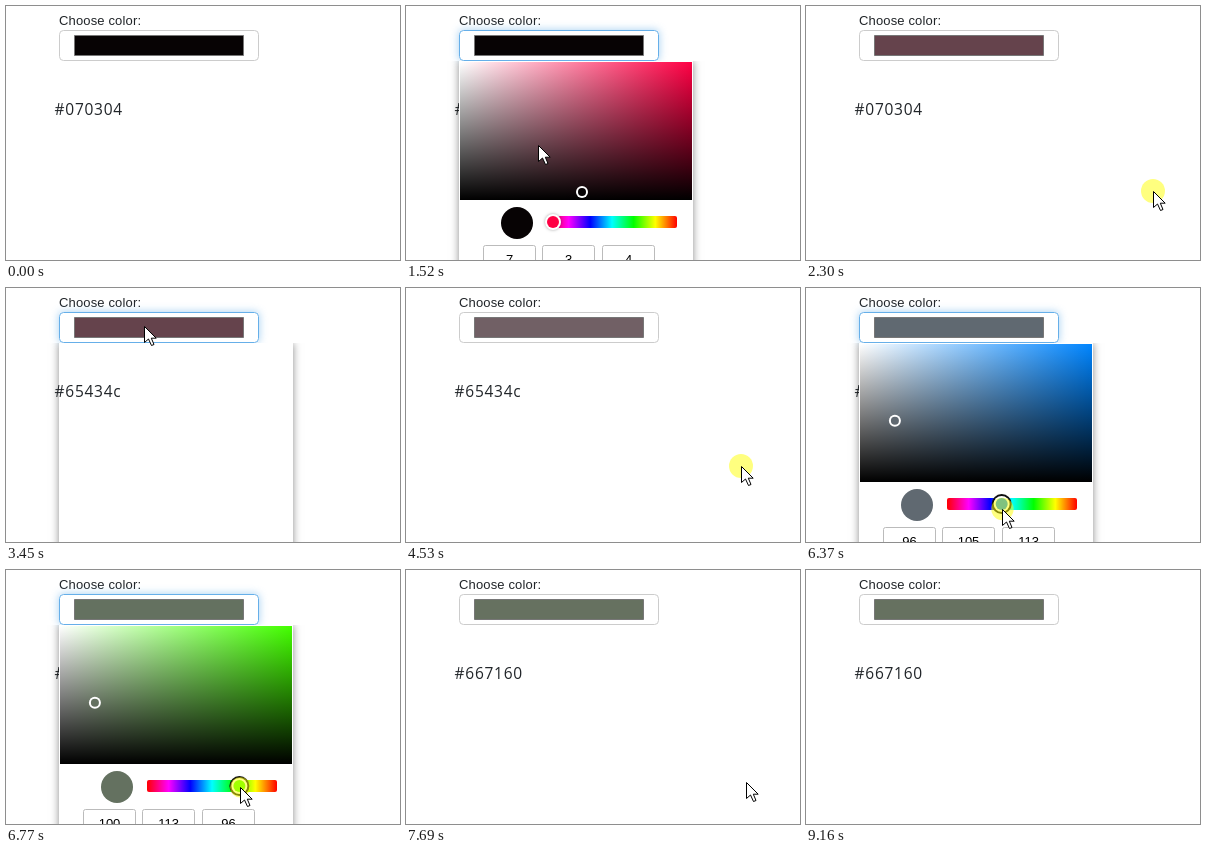
These frames come from a looping animation (394x254 px, 9.47 s). An HTML page with a canvas:

```html
<!DOCTYPE html>
<html lang="en">
<head>
<meta charset="utf-8">
<title>Color input</title>
<style>
html, body { margin: 0; width: 100%; height: 100%; overflow: hidden; background: #fff; }
canvas { display: block; width: 394px; height: 254px; }
</style>
</head>
<body>
<canvas id="stage" width="394" height="254"></canvas>
<script>
const ctx = document.getElementById('stage').getContext('2d');
const LOOP = 9470;
const SANS = '"Liberation Sans", Arial, sans-serif';
const SV = { x: 54, y: 56, w: 232, h: 138 };
const HUE = { x: 141, y: 210, w: 130, h: 12 };
const FIELD = { x: 138, y: 38 };

// Each visit: go to the field, open the picker, choose, then click outside.
const VISITS = [
  { start: 200, pick: { x: 132, y: 139.4 }, leave: 1790, out: 2220, rest: { x: 347, y: 185 } },
  { start: 2640, pick: { x: 88.9, y: 132.85 }, leave: 4130, out: 4450, rest: { x: 335, y: 178 } },
  { start: 4720, pick: { x: 147.5, y: 226 }, dragTo: { x: 236.4, y: 217 },
    leave: 6850, out: 7230, rest: { x: 340, y: 193 } }
];

// Delays after the start of a visit, and after the click outside
const ARRIVE = 580, FOCUS = 630, OPEN = 790, READY = 870, GO = 1010, PICK = 1340;
const HOLD = 120, COMMIT = 310;

const clamp = (v, lo = 0, hi = 1) => Math.min(hi, Math.max(lo, v));
const progress = (t, from, to) => clamp((t - from) / (to - from));
const smooth = k => k * k * (3 - 2 * k);
const easeOut = k => 1 - (1 - k) ** 1.6;
const lerp = (a, b, k) => ({ x: a.x + (b.x - a.x) * k, y: a.y + (b.y - a.y) * k });
const rgb = c => `rgb(${c.join(',')})`;
const hex = c => '#' + c.map(v => v.toString(16).padStart(2, '0')).join('');

function buildLegs() {
  const legs = [];
  let at = { x: 232, y: 262 };
  const move = (from, to, target, ease = smooth) => {
    legs.push({ from, to, a: at, b: target, ease });
    at = target;
  };
  for (const v of VISITS) {
    move(v.start, v.start + ARRIVE, FIELD);
    move(v.start + GO, v.start + PICK - 20, v.pick);
    if (v.dragTo) move(v.start + PICK, v.leave, v.dragTo, easeOut);
    move(v.leave, v.out - 20, v.rest);
  }
  move(7580, 7900, { x: at.x, y: 260 });
  return legs;
}
const LEGS = buildLegs();

function pointerAt(t) {
  if (t > 8260) {
    const k = progress(t, 8260, 9140);
    return { x: 354 + 15 * k, y: 260 - 207 * Math.sin(Math.PI * k) };
  }
  const leg = LEGS.filter(l => l.from <= t).pop() || LEGS[0];
  return lerp(leg.a, leg.b, leg.ease(progress(t, leg.from, leg.to)));
}

function hsv(h, s, v) {
  return [5, 3, 1].map(n => {
    const k = (n + h / 60) % 6;
    return Math.round(255 * v * (1 - s * clamp(Math.min(k, 4 - k))));
  });
}

function stateAt(t) {
  const state = { color: [7, 3, 4], ring: { x: 176, y: 186 }, thumb: 147, hue: 344 };
  for (const v of VISITS.filter(v => t >= v.start + PICK)) {
    if (v.dragTo) {
      state.thumb = pointerAt(Math.min(t, v.leave)).x - 0.8;
      state.hue = 360 * (1 - (state.thumb - HUE.x) / HUE.w);
      state.dragged = true;
    } else {
      state.ring = v.pick;
    }
    const { x, y } = state.ring;
    state.color = hsv(state.hue, (x - SV.x) / SV.w, 1 - (y - SV.y) / SV.h);
  }
  return state;
}

function hexAt(t) {
  const done = VISITS.filter(v => t >= v.out + COMMIT).pop();
  return hex(stateAt(done ? done.out : 0).color);
}

function markerRadius(t) {
  for (const v of VISITS) {
    const picked = v.start + PICK;
    const release = v.dragTo ? v.leave : picked + HOLD;
    if (t >= picked && t < release) return v.dragTo ? 12 - 2 * progress(t, picked, release) : 12;
    const clicks = [v.start + FOCUS, v.out];
    if (clicks.some(c => t >= c && t < c + HOLD + 30)) return 12;
  }
  return 0;
}

function box(x, y, w, h, r, fill, stroke) {
  ctx.beginPath();
  ctx.roundRect(x, y, w, h, r);
  if (fill) { ctx.fillStyle = fill; ctx.fill(); }
  if (stroke) { ctx.strokeStyle = stroke; ctx.lineWidth = 1; ctx.stroke(); }
}

function disc({ x, y }, r, fill) {
  ctx.beginPath();
  ctx.arc(x, y, r, 0, Math.PI * 2);
  ctx.fillStyle = fill;
  ctx.fill();
}

function text(str, x, y, font, color, spacing = 0, align = 'left') {
  ctx.font = font;
  ctx.letterSpacing = spacing + 'px';
  ctx.textAlign = align;
  ctx.fillStyle = color;
  ctx.fillText(str, x, y);
}

function withShadow(color, blur, draw) {
  ctx.save();
  ctx.shadowColor = color;
  ctx.shadowBlur = blur;
  draw();
  ctx.restore();
}

function gradient(x0, y0, x1, y1, stops) {
  const g = ctx.createLinearGradient(x0, y0, x1, y1);
  stops.forEach((c, i) => g.addColorStop(i / (stops.length - 1), c));
  return g;
}

function drawHex(t) {
  text(hexAt(t), 48.5, 109, '15.5px "Open Sans", "Noto Sans", sans-serif', '#212529', 0.75);
}

function drawField(color, glow) {
  text('Choose color:', 53, 19, '13px ' + SANS, '#212529', 0.15);
  withShadow(`rgba(102,175,233,${0.6 * glow})`, 8, () => box(53, 24, 200, 31, 4, '#fff'));
  const border = [204 - 102 * glow, 204 - 29 * glow, 204 + 29 * glow].map(Math.round);
  box(53.5, 24.5, 199, 30, 4, '#fff', rgb(border));
  box(68.5, 29.5, 169, 20, 0, rgb(color), '#777');
}

function drawPanel() {
  ctx.save();
  ctx.beginPath();
  ctx.rect(0, 55, 394, 199);
  ctx.clip();
  withShadow('rgba(0,0,0,.45)', 8, () => box(53, 55, 234, 220, 0, '#fff'));
  ctx.restore();
}

function drawPicker({ color, ring, thumb, hue, dragged }) {
  const fill = rgb(color);
  const pure = rgb(hsv(hue, 1, 1));
  const { x, y, w, h } = SV;

  box(x, y, w, h, 0, gradient(x, 0, x + w, 0, ['#fff', pure]));
  box(x, y, w, h, 0, gradient(0, y, 0, y + h, ['rgba(0,0,0,0)', '#000']));
  disc(ring, 6, '#fff');
  disc(ring, 4, fill);
  disc({ x: 111, y: 217 }, 16, fill);

  const rainbow = Array.from({ length: 7 }, (_, i) => `hsl(${360 - i * 60},100%,50%)`);
  box(HUE.x, HUE.y, HUE.w, HUE.h, 2, gradient(HUE.x, 0, HUE.x + HUE.w, 0, rainbow));
  const knob = { x: thumb, y: 216 };
  if (dragged) disc(knob, 10, '#101010');
  withShadow('rgba(0,0,0,.35)', 3, () => disc(knob, 8, '#fff'));
  disc(knob, 6, pure);

  color.forEach((value, i) => {
    const left = Math.round(77 + i * 59.4);
    box(left + 0.5, 239.5, 52, 24, 2, '#fff', '#bbb');
    text(String(value), left + 26.5, 258, '13px ' + SANS, '#000', 0, 'center');
  });
}

function drawPointer({ x, y }) {
  ctx.save();
  ctx.translate(Math.round(x) + 0.5, Math.round(y) + 0.5);
  const arrow = new Path2D('M0 0V16L4 12.5L7 19L9.5 18L6.8 11.7H11.7Z');
  ctx.fillStyle = '#fff';
  ctx.strokeStyle = '#000';
  ctx.lineWidth = 1;
  ctx.fill(arrow);
  ctx.stroke(arrow);
  ctx.restore();
}

function draw(t) {
  const state = stateAt(t);
  const pointer = pointerAt(t);
  const visit = VISITS.find(v => t >= v.start + OPEN && t < v.out);
  const glow = Math.max(...VISITS.map(v => Math.min(
    progress(t, v.start + FOCUS, v.start + FOCUS + 120),
    1 - progress(t, v.out, v.out + 80))));

  ctx.fillStyle = '#fff';
  ctx.fillRect(0, 0, 394, 254);
  drawField(state.color, glow);
  const ready = visit && t >= visit.start + READY;
  if (ready) drawHex(t);
  if (visit) drawPanel();
  if (ready) drawPicker(state);
  else drawHex(t);

  const radius = markerRadius(t);
  if (radius) disc(pointer, radius, 'rgba(255,255,0,.5)');
  drawPointer(pointer);
}

const start = performance.now();
function tick() {
  draw((performance.now() - start) % LOOP);
  requestAnimationFrame(tick);
}
tick();
</script>
</body>
</html>
```
